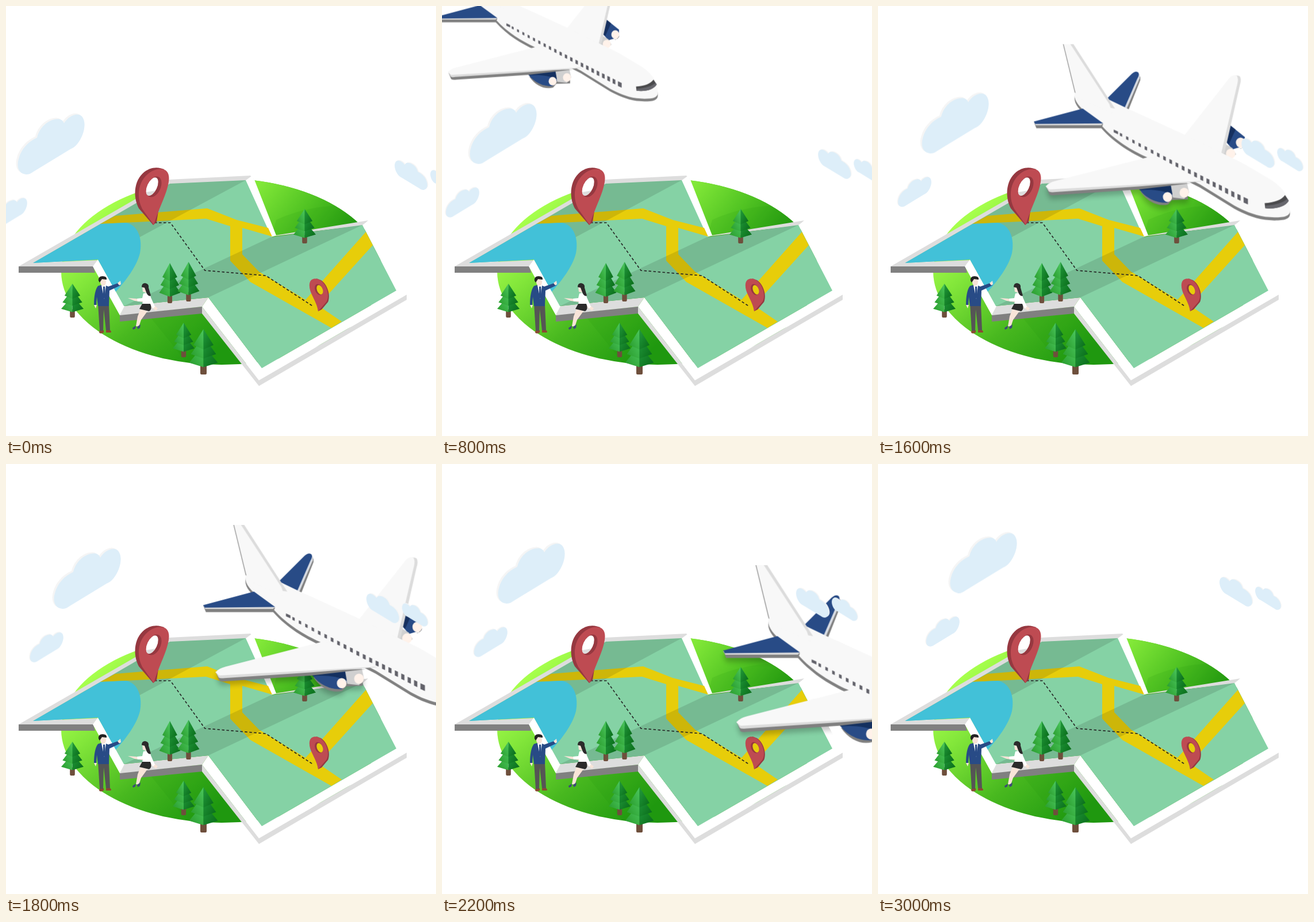
These frames come from a looping animation (748 by 748 pixels, 3200 ms). An HTML page:

```html
<!DOCTYPE html>
<html lang="en">
<head>
<meta charset="utf-8">
<title>Travel map</title>
<style>
  html, body { margin: 0; width: 100%; height: 100%; overflow: hidden; background: #fff; }
  svg { display: block; width: 100vw; height: 100vh; }
  .move { transform-box: view-box; transform-origin: 0 0; }
  .shade { filter: brightness(0) blur(4px); opacity: .22; }
</style>
</head>
<body>
<svg viewBox="0 0 748 748">
  <defs>
    <linearGradient id="hill" gradientUnits="userSpaceOnUse" x1="150" y1="370" x2="350" y2="610">
      <stop offset="0" stop-color="#a6ff4c"/><stop offset=".25" stop-color="#82e63a"/>
      <stop offset=".62" stop-color="#48b81f"/><stop offset="1" stop-color="#209a10"/>
    </linearGradient>
    <linearGradient id="hillR" gradientUnits="userSpaceOnUse" x1="440" y1="310" x2="575" y2="420">
      <stop offset="0" stop-color="#82e838"/><stop offset=".5" stop-color="#52c423"/>
      <stop offset="1" stop-color="#249a10"/>
    </linearGradient>
    <linearGradient id="leafL" x1="1" y1="0" x2="0" y2="1">
      <stop offset="0" stop-color="#4cc860"/><stop offset="1" stop-color="#289a2a"/>
    </linearGradient>
    <linearGradient id="leafR" x1="0" y1="0" x2="1" y2="1">
      <stop offset="0" stop-color="#229a3c"/><stop offset="1" stop-color="#086a18"/>
    </linearGradient>
    <clipPath id="hillClip"><ellipse cx="375" cy="462" rx="279" ry="162"/></clipPath>
    <clipPath id="ground">
      <ellipse cx="375" cy="462" rx="279" ry="162"/>
      <path d="M22 453 284 302 425 295 470 399 629 373 697 503V511L440 661 341 535Z"/>
    </clipPath>
    <path id="puff" d="M35 293C22 292 18 280 22 266C26 250 38 236 54 229C58 212 72 199 86 197C93 195 99 198 101 204C108 192 124 184 132 192C141 202 136 225 124 240C120 245 116 247 112 249L48 288C44 291 40 293 35 293Z"/>
    <g id="cloud">
      <use href="#puff" x="-3" y="-2" fill="#f5f5f5"/>
      <use href="#puff" fill="#ddeef9"/>
    </g>

    <path id="body" d="M197 64 252 76 284 91 300 98 376 133 433 161 470 179 512 204C535 218 545 235 545 255C545 264 536 266 520 266L505 265C485 262 470 255 455 247L400 213 312 168C290 158 262 142 240 117L215 96C201 84 195 75 197 64Z"/>
    <g id="jet">
      <!-- far tail and wing -->
      <path fill="#808080" d="M255 80 297 34Q304 34 303 44L284 92Z"/>
      <path fill="#d9dde4" d="M255 78 296 31Q303 32 302 41L281 90Z"/>
      <path fill="#284b86" d="M249 74 289 34Q296 28 300 32 302 36 298 42L278 88Z"/>
      <path fill="#284b86" d="M447 116 472 136V150L452 156 440 142Z"/>
      <path fill="#16305f" d="M447 116 457 124 446 148 440 142Z"/>
      <path fill="#808080" d="M458 154Q470 157 473 147L466 155Z"/>
      <path fill="#d0d0d0" d="M438 146 452 154 458 164 448 172 433 162Z"/>
      <ellipse cx="465" cy="145" rx="7.500" ry="8" fill="#fff2ea"/>
      <ellipse cx="449" cy="163" rx="7.500" ry="8" fill="#fff2ea"/>
      <path fill="#dcdcdc" d="M376 133 448 42Q456 34 464 38 467 43 464 52L439 162 428 166Z"/>
      <path fill="#f8f8f8" d="M372 136 446 42Q452 34 459 37 462 41 460 50L433 166 400 178Z"/>
      <!-- body -->
      <use href="#body" y="5" fill="#808080"/>
      <use href="#body" fill="#f8f8f8"/>
      <!-- fin -->
      <path fill="#808080" d="M178-14H181L203 68 197 64Z"/>
      <path fill="#dcdcdc" d="M188-14H195L262 90 250 88Z"/>
      <path fill="#f8f8f8" d="M179-14H190L253 83 258 98 200 72Z"/>
      <!-- near tail -->
      <path fill="#808080" d="M131 112 135 122H240L243 115Z"/>
      <path fill="#dcdcdc" d="M131 112 134 117H240L243 113Z"/>
      <path fill="#284b86" d="M131 111 210 90 243 114 133 115Z"/>
      <!-- near engines -->
      <path fill="#808080" d="M303 224C315 242 333 249 348 245L354 238 380 237V230L340 222Z"/>
      <path fill="#d0d0d0" d="M345 212 378 208 382 226 374 236 356 234Z"/>
      <path fill="#284b86" d="M299 216C308 234 330 244 347 242L355 232 352 216Z"/>
      <path fill="#14305f" d="M299 216 352 212 355 229C340 222 320 220 302 222Z"/>
      <ellipse cx="347" cy="233" rx="7.500" ry="8" fill="#fff2ea"/>
      <ellipse cx="374" cy="226" rx="7.500" ry="8" fill="#fff2ea"/>
      <!-- near wing -->
      <path fill="#808080" d="M151 217 156 229Q159 231 166 230L300 221 385 211Z"/>
      <path fill="#dcdcdc" d="M150 215 155 224Q157 226 164 225L300 216 403 208 380 203Z"/>
      <path fill="#f8f8f8" d="M150 216Q154 210 166 207L314 169 350 170 403 207 300 213 156 221Z"/>
      <g id="panes" fill="#62626a"></g>
      <path fill="#4a4a4c" d="M504 243C520 242 531 238 537 230L543 239C537 249 522 253 505 251Z"/>
      <path fill="#66666c" d="M506 247C522 246 534 242 541 236L543 239C537 249 522 253 505 251Z"/>
    </g>
  </defs>

  <g class="move left"><use href="#cloud"/><use href="#cloud" transform="translate(-31.500 239.500) scale(.5)"/></g>

  <!-- hill -->
  <ellipse cx="375" cy="462" rx="279" ry="162" fill="url(#hill)"/>
  <g clip-path="url(#hillClip)">
    <path fill="url(#hillR)" d="M415 280H680V420H460Z"/>
    <path fill="#1c8a0c" opacity=".12" d="M470 372Q540 340 620 350V400H462ZM250 540 400 530 440 640H330Z"/>
  </g>

  <!-- map slab -->
  <path fill="#ddd" d="M22 453 284 302 425 295 432 302 417 305 285 310 47 447 160 442 152 454H22Z"/>
  <path fill="#808080" d="M22 453H152L155 464H22ZM198 537 341 523V535L198 549Z"/>
  <path fill="#ddd" d="M198 538 205 522 352 507 341 523ZM461 401 469 399 630 373 620 382ZM341 523 440 651 697 502V511L440 661 341 535Z"/>
  <path fill="#fff" d="M151 453 160 441 206 522 198 538ZM416 304 427 296 432 302 470 399 461 402ZM341 523 352 507 445 630 679 495 620 381 630 374 697 502 440 651Z"/>
  <path fill="#85d2a5" d="M47 447 285 309 417 303 462 402 620 381 679 495 445 630 352 507 205 522 160 441Z"/>
  <path fill="#e7cd0a" d="M164 379 190 365 350 352 401 372 456 386 463 401 411 386V432L440 462 521 511 626 393 638 416 543 521 584 549 566 560 425 480 390 443V383L348 370Z"/>
  <path opacity=".115" d="M47 447 285 309 417 303 160 441ZM205 522 463 401 620 381 352 507Z"/>
  <path fill="#42c1d8" d="M47 447 165 379 208 377C230 380 238 406 233 430C227 454 208 478 191 497L160 441Z"/>
  <path fill="none" stroke="#222" stroke-width="1.600" stroke-dasharray="4.500 3.500" d="M258 377H286L346 460 452 469 535 523"/>

  <!-- pins -->
  <path fill="#963840" d="M256 381 231 352C221 333 222 306 238 291C250 280 265 279 276 285L262 376Z"/>
  <path fill="#be4b52" d="M257 381 237 353C226 332 230 306 247 292C258 283 272 281 279 287C286 294 284 306 279 322C273 340 263 360 257 381Z"/>
  <g transform="rotate(25 256 315)">
    <ellipse cx="257" cy="314" rx="11.500" ry="19" fill="#963840"/>
    <ellipse cx="254" cy="315" rx="8.500" ry="17" fill="#fff"/>
    <path fill="#ddd" d="M249 328 262 319Q260 331 254 332Q251 332 249 328Z"/>
  </g>
  <path fill="#963840" d="M543 531 549 528 560 515C565 503 559 484 548 477L540 474Z"/>
  <path fill="#be4b52" d="M543 531C540 511 526 499 528 483C530 471 545 472 553 483C561 494 562 508 557 515Z"/>
  <g transform="rotate(-22 545 494)">
    <ellipse cx="544.500" cy="493" rx="6.500" ry="10" fill="#963840"/>
    <ellipse cx="546" cy="494" rx="5" ry="8.500" fill="#e7cd0a"/>
  </g>

  <g id="trees"></g>

  <!-- man -->
  <path fill="#8a4a32" d="M163 564H170V568Q164 571 162 568ZM174 563H180Q185 567 182 568H174Z"/>
  <path fill="#555" d="M160 518H179L181 564H174L170 528 169 565H163Z"/>
  <path fill="#284b86" d="M160 487Q169 483 178 488L195 482 199 486 180 495 179 522H160L158 506 157 521H153Q153 496 160 487Z"/>
  <path fill="#f8e4d8" d="M153 520H158L156 526ZM194 482 199 478 200 484 197 486Z"/>
  <path fill="#fff" d="M166 486H174L171 510Z"/>
  <path fill="#284b86" d="M169 488H172L173 505 171 510 169 505Z"/>
  <ellipse cx="169" cy="480" rx="5" ry="7" fill="#f8e4d8"/>
  <path fill="#222" d="M161 478Q160 470 168 470 176 470 175 476L167 475 163 481Z"/>

  <!-- woman -->
  <path fill="#f8e4d8" d="M234 527 246 531 235 546 231 558 226 557 229 540ZM212 508 226 509 238 511V515L224 513ZM252 516 264 526 261 530 250 522Z"/>
  <path fill="#3c4a78" d="M220 560 226 556 225 561 221 563ZM228 558 234 554 233 560 229 562Z"/>
  <path fill="#fff" d="M239 500Q250 497 252 507L259 523 256 526 250 519H237L238 513 229 514 228 509 237 508Z"/>
  <path fill="#2b2b2b" d="M237 518H251Q255 527 249 531L232 527Z"/>
  <path fill="#f8e4d8" d="M237 488H244V499L238 497Z"/>
  <path fill="#2b2b2b" d="M236 489Q236 482 242 482 249 483 248 490L252 504Q247 506 244 498L241 490Z"/>

  <g clip-path="url(#ground)"><g class="shade"><g transform="translate(0 7)"><use href="#jet" class="move plane"/></g></g></g>
  <use href="#jet" class="move plane"/>
  <g class="move right">
    <use href="#cloud" transform="translate(743 176.400) scale(-.49 .49)"/>
    <use href="#cloud" transform="translate(790.700 213) scale(-.385 .385)"/>
  </g>
</svg>
<script>
const NS = "http://www.w3.org/2000/svg";
const STEP = 100, LAST = 30, LOOP = 3200;

function add(parent, fill, d) {
  const p = document.createElementNS(NS, "path");
  if (fill) p.setAttribute("fill", fill);
  p.setAttribute("d", d);
  parent.append(p);
}

// Three stacked tiers, lowest first: top, outer edge, half width
const TIERS = [[.36, .74, 1], [.16, .55, .88], [0, .35, .7]];
function tree(x, y, w, h) {
  const g = document.getElementById("trees"), r = w / 2, t = Math.max(4, w * .11);
  add(g, "#6e4f3c", `M${x - t} ${y + h * .76}h${2 * t}V${y + h - 2}q0 2-2 2h${4 - 2 * t}q-2 0-2-2Z`);
  for (const [top, edge, k] of TIERS)
    for (const side of [-1, 1])
      add(g, side < 0 ? "url(#leafL)" : "url(#leafR)",
        `M${x} ${y + h * top}L${x + side * r * k} ${y + h * edge}L${x} ${y + h * (edge + .1)}Z`);
}
[[115.5, 483, 39, 59], [519.5, 353, 39, 60], [285, 447, 37, 70],
 [317.5, 445, 38, 69], [309, 551, 38, 60], [343.5, 562, 50, 79]].forEach(a => tree(...a));

// Cabin windows grow slightly toward the nose
const panes = document.getElementById("panes"), COUNT = 21;
for (let i = 0; i <= COUNT; i++) {
  const u = i / COUNT, end = i === 0 || i === COUNT;
  const w = end ? 7 : 3.6 + 1.6 * u, h = 4.5 + 4.5 * u;
  const x = 260 + 210 * u, y = 124 + 109 * u + 4 * u * (1 - u);
  add(panes, "", `M${x} ${y}l${w} ${w * .45}v${h}l${-w} ${-w * .45}Z`);
}

// Flight path of the rear window: step, x, y
const PATH = [[0, -180, -160], [8, 112, 31], [12, 260, 125], [16, 410, 216],
  [18, 487, 261], [22, 643, 341], [26, 809, 413], [30, 990, 475]];
const flight = PATH.map(([k, x, y]) => ({
  offset: k / LAST,
  transform: `translate(${x}px, ${y}px) scale(${1 + (k - 12) * .019}) translate(-260px, -125px)`
}));
const drift = (x, y) => [{ transform: "translate(0px, 0px)" }, { transform: `translate(${x}px, ${y}px)` }];

const anims = [];
function move(sel, frames) {
  for (const el of document.querySelectorAll(sel)) {
    const a = el.animate(frames, { duration: LAST * STEP, fill: "both" });
    a.pause();
    anims.push(a);
  }
}
move(".plane", flight);
move(".left", drift(105, -68.5));
move(".right", drift(-82, -72));

const start = performance.now();
function draw(now) {
  const t = Math.max(0, now - start) % LOOP;
  const at = Math.min(Math.floor(t / STEP), LAST) * STEP;
  for (const a of anims) a.currentTime = at;
  requestAnimationFrame(draw);
}
draw(start);
</script>
</body>
</html>
```
